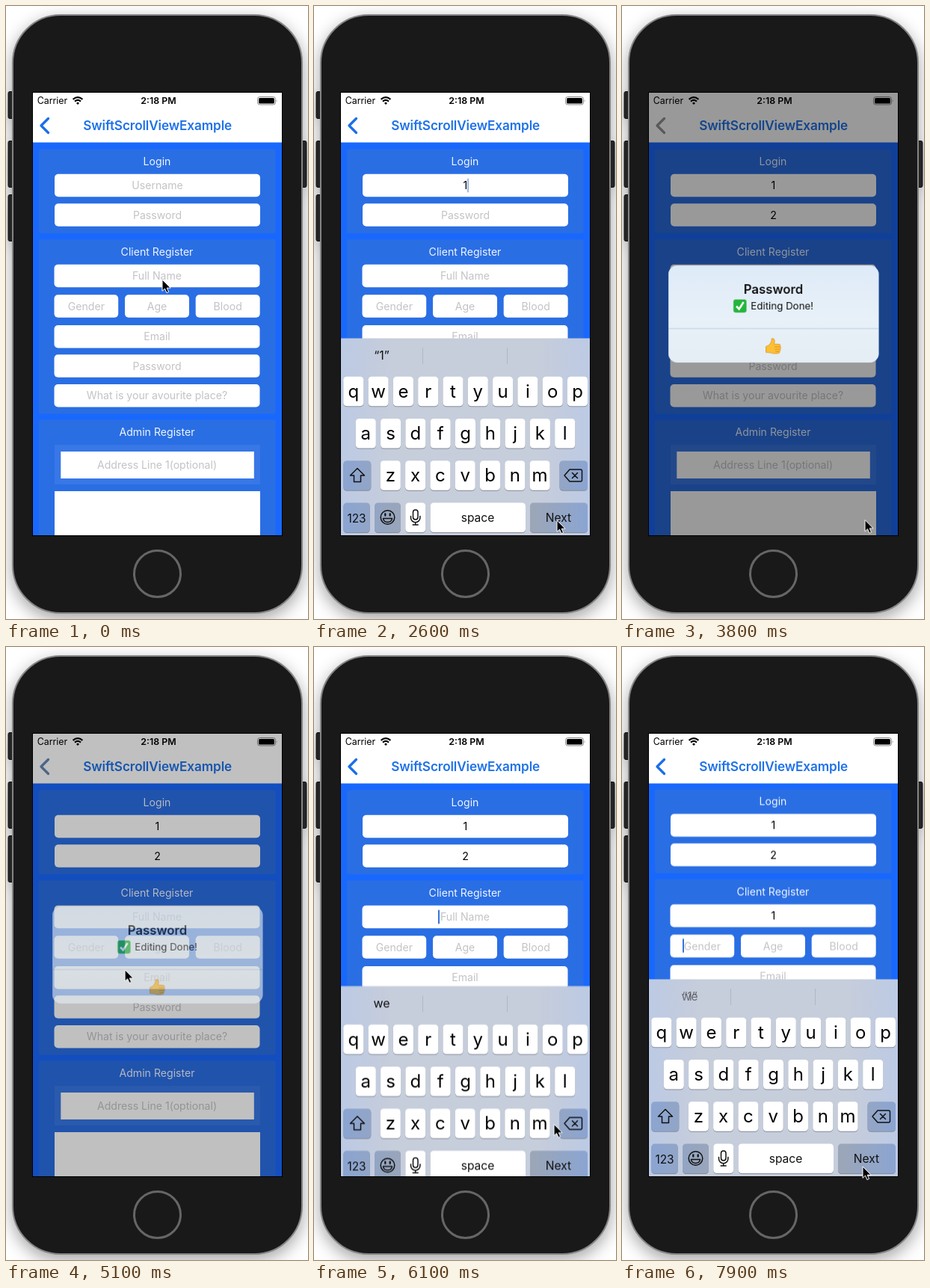
Write an HTML page that moves like this. It is 404 px wide and 820 px high and loops after 8 s.

```html
<!DOCTYPE html>
<html lang="en">
<head>
<meta charset="utf-8">
<title>SwiftScrollViewExample</title>
<style>
html, body { margin: 0; width: 100%; height: 100%; overflow: hidden; background: #fff; }
svg { display: block; width: 100%; height: 100%; }
text { font-family: Inter, Roboto, sans-serif; text-anchor: middle; }
.phone { filter: drop-shadow(0 7px 11px rgba(0, 0, 0, .36)); }
.line { fill: none; stroke: #111; stroke-width: 1.5; stroke-linecap: round; stroke-linejoin: round; }
#alert { transform-box: fill-box; transform-origin: center; }
</style>
</head>
<body>
<svg viewBox="0 0 404 820">
  <defs>
    <clipPath id="screen"><rect x="36" y="116" width="333" height="592"/></clipPath>
    <clipPath id="page"><rect x="36" y="182.500" width="333" height="526"/></clipPath>
    <linearGradient id="board" gradientUnits="userSpaceOnUse" x1="36" x2="369" y1="0" y2="0">
      <stop stop-color="#bccae4"/><stop offset=".2" stop-color="#c6cddb"/>
      <stop offset=".8" stop-color="#c6cddb"/><stop offset="1" stop-color="#bccae4"/>
    </linearGradient>
    <linearGradient id="special" gradientUnits="userSpaceOnUse" x1="39" x2="366" y1="0" y2="0">
      <stop stop-color="#8ba5d2"/><stop offset=".22" stop-color="#98a5bb"/>
      <stop offset=".78" stop-color="#9ba6b8"/><stop offset="1" stop-color="#8ba5d2"/>
    </linearGradient>
    <linearGradient id="glass" x2="0" y2="1">
      <stop stop-color="#deebf8"/><stop offset=".55" stop-color="#e8f1f8"/><stop offset="1" stop-color="#e5eef4"/>
    </linearGradient>
  </defs>

  <g class="phone">
    <g fill="#252525" stroke="#111">
      <rect x="3" y="114.500" width="8" height="36" rx="2"/>
      <rect x="3" y="180.500" width="8" height="62" rx="2"/>
      <rect x="3" y="252.500" width="8" height="62" rx="2"/>
      <rect x="394" y="180.500" width="8" height="62" rx="2"/>
    </g>
    <rect x="9" y="12" width="387" height="800" rx="64" fill="#191919" stroke="#858585" stroke-width="2"/>
  </g>
  <circle cx="202.500" cy="759.500" r="31" fill="#191919" stroke="#666" stroke-width="3"/>
  <rect x="35" y="115" width="335" height="594"/>

  <g clip-path="url(#screen)">
    <rect x="36" y="116" width="333" height="592" fill="#1968fe"/>
    <g clip-path="url(#page)"><g id="content"></g></g>
    <rect x="36" y="116" width="333" height="66.500" fill="#fff"/>
    <g id="bar"></g>
    <path id="back" d="M56.500 150.500L47 160l9.500 9.500" fill="none" stroke="#1a6fe8" stroke-width="3.300" stroke-linecap="round" stroke-linejoin="round"/>
    <g fill="none" stroke="#000" stroke-width="2.200">
      <path d="M89.600 124.800Q96 119.300 102.400 124.800M92 127.600Q96 124.200 100 127.600"/>
      <path d="M94 130l2-1.500 2 1.500-2 2z" fill="#000" stroke="none"/>
    </g>
    <rect x="336.500" y="121.500" width="24" height="10.500" rx="3" fill="#fff" stroke="#888"/>
    <rect x="338" y="123" width="21" height="7.500" rx="1.600"/>
    <path d="M361.800 125q1.600 1.700 0 3.600z" fill="#888"/>
    <g id="keyboard"></g>
    <rect id="dim" x="36" y="116" width="333" height="592" opacity="0"/>
    <g id="alert"></g>
  </g>

  <g id="pointer"><path d="M0 0v15.300l3.500-3.200 2.400 5.500 2.700-1.200-2.400-5.200h4.900z" fill="#000" stroke="#fff"/></g>
</svg>

<script>
const LOOP = 8000;
const $ = id => document.getElementById(id);
const attrs = o => Object.entries(o).map(([k, v]) => `${k}="${v}"`).join(' ');
const rect = (x, y, width, height, fill, rx = 0, more = {}) =>
  `<rect ${attrs({x, y, width, height, fill, rx, ...more})}/>`;
// Text is centred on its cap height.
const label = (s, x, y, size, fill = '#111', more = {}) =>
  `<text ${attrs({x, y: y + size * .36, 'font-size': size, fill, ...more})}>${s}</text>`;
const bold = {'font-weight': 600};

// Form
const field = (hint, x, y, w, name) => {
  const cx = x + w / 2, cy = y + 15.2;
  return rect(x, y, w, 30.5, '#fff', 5) +
    label(hint, cx, cy, 14.1, '#c3c3c7', name ? {id: name + 'Hint'} : {});
};
const value = (s, y, id) => label(s, 202.5, y, 14.2, '#000', {id});
const card = (title, y, h) => rect(44, y, 316.5, h, '#2a6ee4', 2) +
  label(title, 202, y + 16.8, 14.1, '#f0f5ff');

$('content').innerHTML =
  card('Login', 191.5, 112.5) +
  field('Username', 65, 224.7, 275, 'user') + field('Password', 65, 264.3, 275, 'pass') +
  card('Client Register', 312.3, 233.5) +
  field('Full Name', 64.5, 345.7, 275, 'name') +
  field('Gender', 64.5, 386.3, 85.7) + field('Age', 159, 386.3, 86) + field('Blood', 253.7, 386.3, 86) +
  field('Email', 64.5, 427, 275) + field('Password', 64.5, 466.3, 275) +
  field('What is your avourite place?', 64.5, 506, 275) +
  card('Admin Register', 553.5, 200) +
  rect(65, 587, 275, 53, '#3877e6') + rect(73.3, 596, 258.5, 36, '#fff') +
  label('Address Line 1(optional)', 202, 614, 14.1, '#c3c3c7') +
  rect(65, 649, 275, 90, '#fff') +
  value(1, 240, 'userValue') + value(2, 279.5, 'passValue') + value(1, 361, 'nameValue') +
  `<g id="caretSpot"><rect id="caret" x="-1" y="-9.500" width="2" height="19" rx="1" fill="#3474dd"/></g>`;

$('bar').innerHTML =
  label('Carrier', 62, 127, 12.4, '#000') + label('2:18 PM', 204, 127, 12.4, '#000', bold) +
  label('SwiftScrollViewExample', 202.7, 160, 17.2, '#1f72e8', {...bold, 'letter-spacing': -.12});

// Keyboard
const key = (x, y, w, fill = '#fff') =>
  rect(x, y + 1, w, 39.5, '#858c9a', 4.5) + rect(x, y, w, 39.5, fill, 4.5);
const row = (letters, x, y) => [...letters].map((c, i) =>
  key(x + i * 33.3, y, 27) + label(c, x + 13.5 + i * 33.3, y + 19.5, 24, '#000')).join('');
const special = (x, y, w) => key(x, y, w, 'url(#special)');

$('keyboard').innerHTML =
  rect(36, 444.5, 333, 264, 'url(#board)') +
  rect(145, 457, 1, 22, '#b0b6c2') + rect(258, 457, 1, 22, '#b0b6c2') +
  label('we', 90.5, 467, 16, '#111', {id: 'hintWe'}) +
  label('“1”', 90.5, 467, 16, '#111', {id: 'hintOne'}) +
  label('“2”', 90.5, 467, 16, '#111', {id: 'hintTwo'}) +
  row('qwertyuiop', 39.3, 495.7) + row('asdfghjkl', 55.8, 552) + row('zxcvbnm', 88.8, 608.3) +
  special(39.3, 608.3, 37) + special(328.5, 608.3, 37.5) +
  special(39.3, 664.5, 35.5) + special(81, 664.5, 35) + key(122.3, 664.5, 27) +
  key(155.6, 664.5, 127.4) + special(289, 664.5, 77) +
  label('123', 57, 685, 15.4) + label('space', 219, 684, 15.6) + label('Next', 327, 684, 15.6) +
  `<g id="done">${key(289, 664.5, 77, '#0a7aff')}${label('Done', 327, 684, 15.6, '#fff')}</g>
  <g class="line">
    <path d="M58 618.500l9.500 9.500h-5v8.500h-9v-8.500h-5z"/>
    <path d="M342 620h14.500q2 0 2 2v12q0 2-2 2H342l-7-8zM345.500 624.500l7 7m0-7l-7 7"/>
    <circle cx="98.500" cy="684" r="9.300"/>
    <path d="M92.500 685.500h12q-.8 5-6 5t-6-5z"/>
    <path d="M95.300 679.500v2m6.400-2v2" stroke-width="2.300"/>
    <rect x="132.500" y="674" width="6.500" height="13" rx="3.200"/>
    <path d="M129.500 682.500v2a6.200 6.200 0 0 0 12.400 0v-2m-6.200 8.500v3m-3.500 0h7"/>
  </g>`;

// Alert
$('alert').innerHTML =
  rect(62, 347, 281.5, 130, 'url(#glass)', 12) + rect(62, 431, 281.5, 1, '#b9cfe4') +
  label('Password', 202.5, 379, 16.8, '#111', bold) + label('Editing Done!', 214.2, 401, 13.3) +
  rect(149, 392.5, 17.5, 17.5, '#24b53c', 3) +
  `<path d="M153 401.500l3.600 4 6-9.500" fill="none" stroke="#fff" stroke-width="2.600"/>
  <path d="M192.500 455.500q4-1 6-4.500t1.700-6q2.600-1.200 3.700 1.500.8 2.500-.6 5.500l7.200.3q2 .7 1.400 3 1 1.500 0 3.200.6 1.800-.7 3 .2 2.800-2.700 3.300-7 .8-10-1l-6-.5z" fill="#fcbf35" stroke="#d98f1c" stroke-width=".7"/>
  <path d="M204 456h7m-6.500 3.200h6.700m-6 3h5" stroke="#d98f1c" stroke-width=".8"/>`;

// Motion: every track is a list of [ms, declarations].
let css = '';
const track = (id, steps, easing = 'linear') => {
  const all = [[0, steps[0][1]], ...steps, [LOOP, steps.at(-1)[1]]];
  css += `@keyframes ${id}{${all.map(([ms, d]) => `${ms / LOOP * 100}%{${d}}`).join('')}}
#${id}{animation:${id} ${LOOP}ms ${easing} infinite}`;
};
const at = (x, y) => `transform:translate(${x}px,${y}px)`;
const alpha = o => `opacity:${o}`;
const show = (id, spans, fade = 1) => track(id, spans.flatMap(([from, to]) => [
  ...(from > 0 ? [[from, alpha(0)], [from + fade, alpha(1)]] : [[0, alpha(1)]]),
  ...(to < LOOP ? [[to, alpha(1)], [to + fade, alpha(0)]] : [])
]));

const typed = {user: 2075, pass: 2975, name: 7000};
for (const [name, ms] of Object.entries(typed)) {
  show(name + 'Hint', [[0, ms]]);
  show(name + 'Value', [[ms, LOOP]]);
}
show('hintWe', [[500, 2075], [2700, 2975], [5600, 7000], [7840, LOOP]], 120);
show('hintOne', [[2075, 2700], [7000, 7840]], 120);
show('hintTwo', [[2975, 3900]], 120);
show('done', [[2700, 3900]]);

const out = ';animation-timing-function:cubic-bezier(.215,.61,.355,1)';
const up = at(0, 0), down = at(0, 264);
track('keyboard', [[660, down + out], [1060, up], [3360, up + out], [3760, down], [5820, down + out], [6220, up]]);

const spots = [[660, 167, 240], [2075, 206, 240], [2700, 169, 279.5], [2975, 207.5, 279.5],
  [3360, -50, 0], [5800, 167, 361], [7000, 206, 361], [7750, 82, 401]];
track('caretSpot', [[0, at(-50, 0)], ...spots.map(([ms, x, y]) => [ms, at(x, y)])], 'step-end');
const blink = [[0, 1], [450, 1], [600, 0], [850, 0], [999, 1]];
track('caret', spots.flatMap(([start], i) => {
  const end = spots[i + 1]?.[0] ?? LOOP, steps = [];
  for (let ms = start; ms < end; ms += 1000)
    for (const [d, o] of blink) if (ms + d < end) steps.push([ms + d, alpha(o)]);
  return steps;
}));

track('content', [[7780, at(0, 0) + ';animation-timing-function:ease-in'], [7900, at(0, -1.5)], [8000, at(0, -5)]]);

const fadeTimes = (off, on) => [[3430, off], [3700, on], [4960, on], [5333, off]];
track('dim', fadeTimes(alpha(0), alpha(.4)));
track('back', fadeTimes('stroke:#1a6fe8', 'stroke:#949494'));
track('alert', [[3430, 'opacity:0;transform:scale(1.18)' + out], [3740, 'opacity:1;transform:none'],
  [4960, alpha(1) + ';transform:none'], [5333, alpha(0) + ';transform:none'], [5400, 'opacity:0;transform:scale(1.18)']]);

track('pointer', [[50, 209, 366], [400, 213, 238], [900, 213, 240], [1100, 213, 268], [1500, 300, 752],
  [1600, 312, 757], [2100, 318, 757], [2400, 325, 688], [3800, 325, 688], [4200, 325, 486], [4600, 227, 459],
  [4950, 227, 459], [5100, 159, 432], [5450, 190, 360], [5800, 200, 360], [6100, 321, 638], [6250, 325, 702],
  [7200, 325, 702], [7600, 322, 695]].map(([ms, x, y]) => [ms, at(x, y)]));

document.head.append(Object.assign(document.createElement('style'), {textContent: css}));
</script>
</body>
</html>
```
